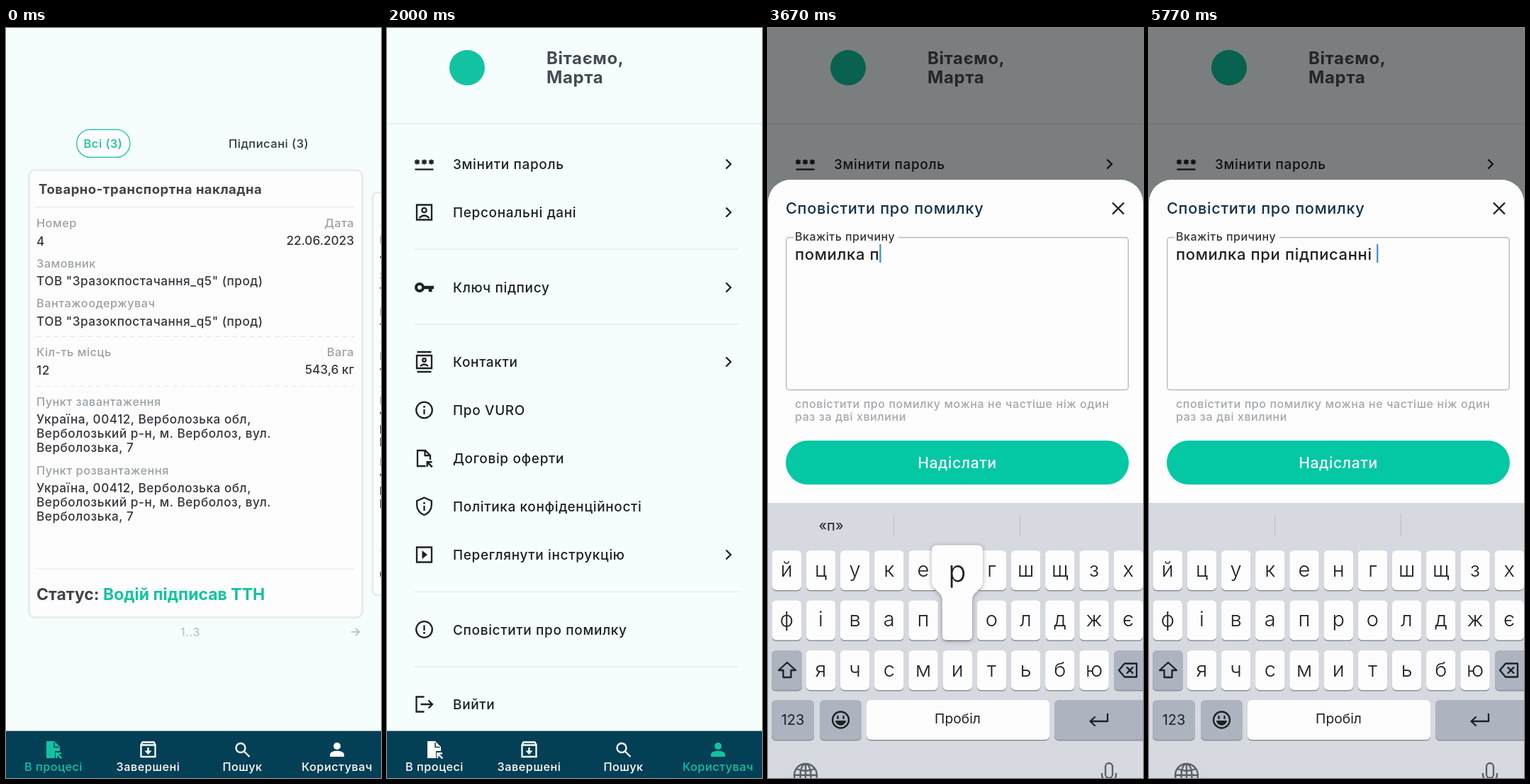
Write an HTML page that moves like this. It is 529x1058 px and loops after 6.2 s.

```html
<!DOCTYPE html>
<html lang="uk">
<head>
<meta charset="utf-8">
<title>Сповіщення про помилку</title>
<style>
  html, body { margin: 0; width: 100%; height: 100%; overflow: hidden; background: #f6fdfd; }
  svg { display: block; width: 100%; height: 100%; font-weight: 450; }
  text { font-family: Inter, "Noto Sans", sans-serif; white-space: pre; }
  .wide { letter-spacing: .5px; }
  .line { fill: none; stroke: currentColor; stroke-width: 2.3; }
  .solid { fill: currentColor; stroke: none; }
</style>
</head>
<body>
<svg id="stage" viewBox="0 0 529 1058"></svg>
<script>
const INK = '#1d2125', TEXT = '#33373b', GREY = '#9aa1a6', GREEN = '#12c3a1';
const LOOP = 6200;

const text = (x, y, s, size, fill = INK, more = 'class="wide"') =>
  `<text x="${x}" y="${y}" font-size="${size}" fill="${fill}" ${more}>${s}</text>`;
const mid = 'text-anchor="middle"', end = 'class="wide" text-anchor="end"';
const rule = (x1, x2, y, color = '#e1e6e8', more = '') =>
  `<path d="M${x1} ${y}H${x2}" stroke="${color}" stroke-width="1.2" ${more}/>`;
const box = (x, y, w, h, r, fill, more = '') =>
  `<rect x="${x}" y="${y}" width="${w}" height="${h}" rx="${r}" fill="${fill}" ${more}/>`;
const stroke = d => `<path class="line" d="${d}"/>`;
const solid = d => `<path class="solid" d="${d}"/>`;
const at = (x, y, body, more = '') => `<g transform="translate(${x} ${y})" ${more}>${body}</g>`;

// Icons are centred on 0,0
const star = x => stroke(`M${x} -6.5v7M${x - 3.2} -5l6.4 4M${x - 3.2} -1l6.4 -4`);
const pageArrow = solid('M3 4h8v2.4h-3.8l5 5 -1.8 1.8 -5 -5v3.8h-2.4z');
const info = stroke('M0 -1v7') + solid('M-1.3 -6h2.6v2.6h-2.6z');
const ring = '<circle class="line" r="11.3"/>';
const face = '<circle class="line" cy="-3" r="3.2"/>' + stroke('M-7 8q7 -7 14 0');
const icons = {
  password: star(-10) + star(0) + star(10) + stroke('M-13 7.5h26'),
  profile: stroke('M-10.5 -10.5h21v21h-21z') + face,
  key: '<circle class="line" cx="-6.5" r="5" style="stroke-width:4"/>' +
    solid('M-1 -2.3h14.5v4.6h-2.5v4h-4.6v-4h-7.4z'),
  contacts: stroke('M-10.5 -9h21v18h-21zM-10 -14h20M-10 14h20') +
    '<circle class="line" cy="-2.5" r="2.3"/>' + stroke('M-5.5 6q5.5 -5 11 0'),
  about: ring + info,
  offer: stroke('M2 11h-11.5v-22h11l7 7v6M1 -11v7h7') + pageArrow,
  shield: stroke('M0 -12.5l10.3 4.5v6.5c0 6 -4.4 11.5 -10.3 13.5c-5.9 -2 -10.3 -7.5 -10.3 -13.5v-6.5z') + info,
  video: stroke('M-10.5 -10.5h21v21h-21z') + solid('M-3 -6v12l7.5 -6z'),
  alert: ring + stroke('M0 -6v7.5') + solid('M-1.3 3.5h2.6v2.6h-2.6z'),
  exit: stroke('M0 -10.5h-11v21h11M-5 0h16M6 -5.5l5.5 5.5 -5.5 5.5'),
  file: solid('M-10 -12h11l8 8v6h-7v10h-12z') +
    '<path d="M1 -10v6.5h6.5" fill="none" stroke="#033f55" stroke-width="1.5"/>' + pageArrow,
  archive: stroke('M-10 -7l2 -3.5h16l2 3.5v17h-20zM-10 -6.5h20M0 -3v7') + solid('M-5 1.5h10l-5 5.5z'),
  search: '<circle class="line" cx="-2.5" cy="-2.5" r="6.5"/>' + stroke('M2.5 2.5l7.5 7.5'),
  person: '<circle class="solid" cy="-5" r="5"/>' + solid('M-10 10v-3c0 -7 20 -7 20 0v3z'),
};

// Waybill list
const firm = 'ТОВ "Зразокпостачання_q5" (прод)';
const address = ['Україна, 00412, Верболозька обл,', 'Верболозький р-н, м. Верболоз, вул.', 'Верболозька, 7'];
const field = (y, label, ...lines) => text(43, y, label, 16.3, GREY) +
  lines.map((s, i) => text(43, y + 25.5 + 20 * i, s, 17.2, TEXT)).join('');
const fieldRight = (y, label, value) => text(491, y, label, 16.3, GREY, end) +
  text(491, y + 25, value, 17.2, TEXT, mid.replace('middle', 'end'));
const dashed = 'stroke-dasharray="7 5"';
const card = '<g id="card">' +
  box(33, 201, 469, 630, 7, '#fefdfe',
    'stroke="#dfe1e4" stroke-width="1.2" style="filter:drop-shadow(0 0 1.5px #0002)"') +
  text(46, 234, 'Товарно-транспортна накладна', 18.5, '#404448', 'class="wide" font-weight="700"') +
  rule(43, 491, 252.5) +
  field(281, 'Номер', '4') + fieldRight(281, 'Дата', '22.06.2023') +
  field(337.5, 'Замовник', firm) + field(394, 'Вантажоодержувач', firm) +
  rule(43, 491, 435.5, '#e1e6e8', dashed) +
  field(463, 'Кіл-ть місць', '12') + fieldRight(463, 'Вага', '543,6 кг') +
  rule(43, 491, 505, '#e1e6e8', dashed) +
  field(532.5, 'Пункт завантаження', ...address) + field(629.5, 'Пункт розвантаження', ...address) +
  rule(43, 491, 763) +
  text(43, 807, `Статус: <tspan fill="${GREEN}">Водій підписав ТТН</tspan>`, 23, '#404448', 'font-weight="700"') +
  '</g>';
const list = '<g id="list">' +
  box(99.7, 143.3, 75.2, 39, 19, '#fbfefe', `stroke="${GREEN}" stroke-width="1.3"`) +
  text(137, 169, 'Всі (3)', 16.5, GREEN, 'class="wide" ' + mid) +
  text(314, 169, 'Підписані (3)', 16.5, TEXT) + card +
  '<use href="#card" transform="translate(488 51.6) scale(.9)"/>' +
  text(246, 858, '1..3', 16, '#bcc2c5') +
  '<path d="M487 852h11M493 847l5.5 5 -5.5 5" fill="none" stroke="#b0b6b9" stroke-width="1.4"/></g>';

// User menu: icon, label, centre y, opens another page
const rows = [
  ['password', 'Змінити пароль', 192, 1], ['profile', 'Персональні дані', 260, 1],
  ['key', 'Ключ підпису', 366, 1], ['contacts', 'Контакти', 471, 1],
  ['about', 'Про VURO', 539], ['offer', 'Договір оферти', 607],
  ['shield', 'Політика конфіденційності', 675], ['video', 'Переглянути інструкцію', 743, 1],
  ['alert', 'Сповістити про помилку', 848.5], ['exit', 'Вийти', 954],
];
const bold = 'font-weight="700" letter-spacing=".6"';
const menu = '<g id="menu">' +
  `<circle cx="113" cy="56" r="25" fill="${GREEN}"/>` +
  text(225, 50.5, 'Вітаємо,', 24, '#454b52', bold) + text(225, 78, 'Марта', 24, '#454b52', bold) +
  rule(0, 529, 135, '#dbe1e3') + [312, 418, 795.5, 901].map(y => rule(38, 496, y)).join('') +
  rows.map(([icon, label, y, more]) => at(52.5, y, icons[icon], `color="${INK}"`) +
    text(93, y + 7, label, 19, INK, 'letter-spacing=".65"') +
    (more ? at(482.3, y, stroke('M-4 -6.5l6.5 6.5 -6.5 6.5'), `color="${INK}"`) : '')).join('') +
  '</g>';

const tabs = [['file', 'В процесі', 67], ['archive', 'Завершені', 200.5], ['search', 'Пошук', 333.5], ['person', 'Користувач', 467]];
const nav = box(0, 991.6, 529, 67, 0, '#033f55') + tabs.map(([icon, label, x]) =>
  `<g class="tab">${at(x, 1018, icons[icon])}${text(x, 1048, label, 16.3, 'currentColor', 'class="wide" ' + mid)}</g>`).join('');

const touch = '<g id="touch" fill="none"><circle r="52.5" stroke="#333" stroke-width="21" opacity=".45"/>' +
  '<circle r="42" fill="#333" opacity=".28"/></g>';

// Report sheet, y from its top edge
const sheet = '<g id="sheet">' + box(0, 0, 529, 520, 32, '#fdfdfe') +
  text(25, 48, 'Сповістити про помилку', 21.7, '#12304a', 'letter-spacing=".7"') +
  at(494, 40.5, stroke('M-8 -8l16 16M8 -8l-16 16'), `color="${INK}"`) +
  box(25.7, 81.5, 482.6, 215, 4, 'none', 'stroke="#b7babc" stroke-width="1.4"') +
  box(36, 78, 148, 8, 0, '#fdfdfe') + text(38, 86, 'Вкажіть причину', 16, TEXT) +
  text(38, 112.5, '', 22, INK, 'id="typed" letter-spacing=".65"') +
  box(0, 91, 2.2, 26, 0, '#3d8dcc', 'id="caret"') +
  text(38, 322, 'сповістити про помилку можна не частіше ніж один', 16, '#a4a8ab', 'letter-spacing=".6"') +
  text(38, 340, 'раз за дві хвилини', 16, '#a4a8ab', 'letter-spacing=".6"') +
  box(25, 368, 484, 62, 31, '#04c7a4') +
  text(267, 407, 'Надіслати', 21, '#fff', 'font-weight="500" letter-spacing=".7" ' + mid) + '</g>';

// Keyboard, y from its top edge
const key = (x, y, w, fill = '#fdfdfe') =>
  box(x, y + 1.5, w, 56, 6, '#8b9098') + box(x, y, w, 56, 6, fill);
const DARK = '#adb4c0', keyX = i => 5.5 + 48.2 * i, keyPos = {};
const letters = ['йцукенгшщзх', 'фівапролджє', ' ячсмитьбю'].map((row, r) => [...row].map((c, i) => {
  if (c === ' ') return '';
  const x = keyX(i), y = 67 + 70.5 * r;
  keyPos[c] = [x + 20.5, y];
  return key(x, y, 41.5) + text(x + 20.7, y + 36.5, c, 29, INK, 'font-weight="300" ' + mid);
}).join('')).join('');
const dark = `color="${INK}" stroke-linejoin="round" stroke-linecap="round"`;
const plain = 'font-weight="400" ' + mid;
const keyboard = '<g id="keyboard">' + box(0, 0, 529, 400, 0, '#d6d9e0') +
  '<path d="M177.5 17v30M355.5 17v30" stroke="#bcc0c8" stroke-width="1.2"/>' +
  [89, 267, 445].map(x => text(x, 39, '', 20, INK, 'class="hint" ' + plain)).join('') + letters +
  key(5, 208, 43, DARK) + at(27, 236, stroke('M0 -11l12 11h-6.5v10h-11v-10h-6.5z'), dark) +
  key(488, 208, 46, DARK) +
  at(508, 236, stroke('M-13 0l8 -9.5h17v19h-17zM-1.5 -4l8 8M6.5 -4l-8 8'), dark) +
  key(5, 278, 60, DARK) + text(35, 313, '123', 20, INK, plain) +
  key(73, 278, 59, DARK) + at(102.5, 306, '<circle class="line" r="11.5"/>' +
    stroke('M-4 -5v3M4 -5v3') + solid('M-7.5 1h15c-1 9 -14 9 -15 0z'), dark) +
  key(139, 278, 258) + text(267.5, 311, 'Пробіл', 19.3, INK, plain) +
  key(404, 278, 135, DARK) + at(467, 306, stroke('M12 -8v10h-24M-6 -4l-6.5 6 6.5 6'), dark) +
  at(53, 384, '<circle class="line" r="16"/><ellipse class="line" rx="7.5" ry="16"/>' +
    stroke('M0 -16v32M-16 0h32M-13 -9q13 6 26 0'), 'color="#5a5f67"') +
  at(481, 384, '<rect class="line" x="-5" y="-17" width="10" height="21" rx="5"/>' +
    stroke('M-10 -3v2c0 13 20 13 20 0v-2M0 9v7'), 'color="#5a5f67"') +
  '<g id="popup"><path d="M-28 -78h56q8 0 8 8v42c0 15 -15 14 -15 28v50q0 6 -6 6h-30q-6 0 -6 -6v-50c0 -14 -15 -13 -15 -28v-42q0 -8 8 -8z"' +
  ' fill="#fdfdfe" style="filter:drop-shadow(0 1px 3px #0005)"/>' +
  text(0, -27, '', 42, INK, 'font-weight="300" ' + mid) + '</g></g>';

const $ = id => document.getElementById(id);
$('stage').innerHTML = list + menu + nav + touch +
  box(0, 0, 529, 1058, 0, '#000', 'id="shade" opacity=".5"') + sheet + keyboard;
const show = (id, on) => $(id).style.display = on ? '' : 'none';
const move = (id, x, y) => $(id).setAttribute('transform', `translate(${x} ${y})`);
const tabNodes = document.querySelectorAll('.tab'), hints = document.querySelectorAll('.hint');

// Time, typed text, pressed key, suggestions
const typing = [
  [2330, ''],
  [2670, 'п', 'о', '«п»'],
  [3000, 'поми', 'л', '«поми»', 'помилка', 'помилки'],
  [3330, 'помилка '],
  [3670, 'помилка п', 'р', '«п»'],
  [4000, 'помилка при', '', '«при»', 'приклад'],
  [4330, 'помилка при під', 'п', '«під»', 'підпис', 'підписання'],
  [4670, 'помилка при підпис', 'а', '«підпис»', 'підписанні', 'підписання'],
  [5000, 'помилка при підписа', '', '«підписа»', 'підписанні', 'підписання'],
  [5330, 'помилка при підписанні', '', '', 'підписанні', 'підписання'],
  [5770, 'помилка при підписанні '],
];

function drawReport(t) {
  const [, typed, pressed, ...words] = typing.findLast(s => t >= s[0]);
  const rising = t < 2670;
  move('sheet', 0, rising ? 283 : 214);
  move('keyboard', 0, rising ? 724 : 670);
  $('typed').textContent = typed;
  $('caret').setAttribute('x', 38 + (typed ? $('typed').getComputedTextLength() : 0));
  hints.forEach((h, i) => h.textContent = words[i] || '');
  show('popup', pressed);
  if (pressed) {
    move('popup', ...keyPos[pressed]);
    $('popup').lastChild.textContent = pressed;
  }
}

function draw(now) {
  const t = now % LOOP, inMenu = t >= 1000, report = t >= 2330;
  show('list', !inMenu);
  show('menu', inMenu);
  tabNodes.forEach((n, i) => n.setAttribute('color', i === (inMenu ? 3 : 0) ? GREEN : '#fff'));
  show('touch', t >= 670 && t < 1670);
  move('touch', ...(inMenu ? [63, 843] : [467, 1020]));
  ['shade', 'sheet', 'keyboard'].forEach(id => show(id, report));
  if (report) drawReport(t);
}

const start = performance.now();
function tick() {
  draw(performance.now() - start);
  requestAnimationFrame(tick);
}
tick();
</script>
</body>
</html>
```
